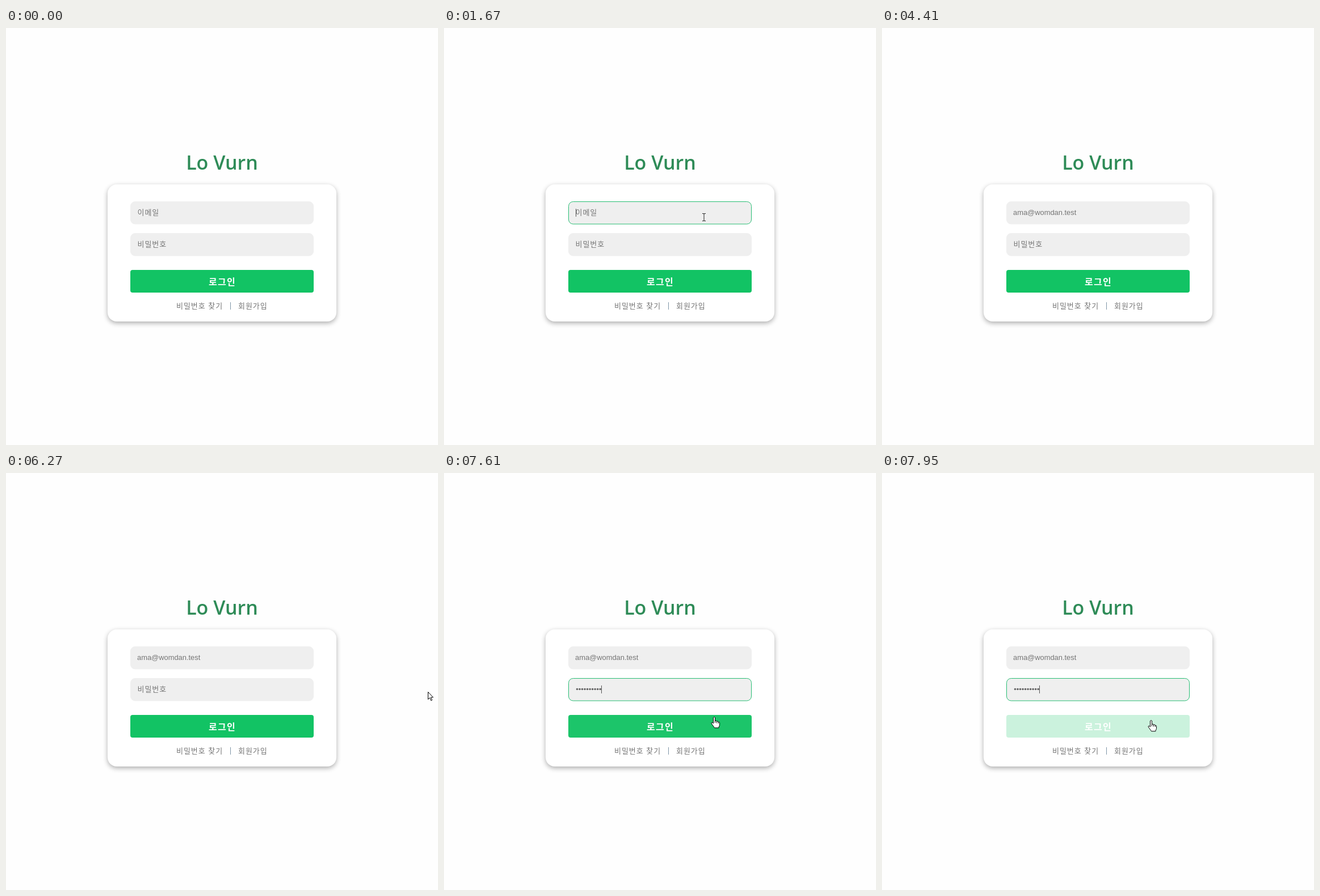
An HTML page that plays this animation: 761 px wide and 736 px high, repeating every 8 s.

```html
<!DOCTYPE html>
<html lang="ko">
<head>
<meta charset="utf-8">
<title>Login</title>
<style>
  html, body { margin: 0; width: 100%; height: 100%; overflow: hidden; background: #fefefe; }
  svg { display: block; position: absolute; left: 0; top: 0; }
  .card { position: absolute; left: 179px; top: 276px; width: 403px; height: 241.5px; border-radius: 16px; background: #fff; box-shadow: 0 3px 9px rgba(0, 0, 0, .32); }
  text { font: 13px "Noto Sans CJK KR", "Noto Sans CJK", sans-serif; fill: #757575; }
  .ko { letter-spacing: .95px; }
  .title { font: 600 34px "Open Sans", "Noto Sans", sans-serif; fill: #2e8b57; }
  .mail { font: 12.9px "Liberation Sans", Arial, sans-serif; }
  .label { font-size: 16px; font-weight: 700; letter-spacing: 1.2px; fill: #fff; }
  .field { fill: #efefef; stroke-width: 1; }
  .caret { fill: #555; }
  .pointer { fill: #fff; stroke: #000; stroke-width: 1; stroke-linejoin: round; }
</style>
</head>
<body>
<div class="card"></div>
<svg width="761" height="736" viewBox="0 0 761 736">
  <text class="title" x="380.5" y="250" text-anchor="middle">Lo Vurn</text>

  <rect id="field1" class="field" x="219.5" y="306.5" width="322" height="39.5" rx="8"/>
  <text id="hint1" class="ko" x="231.5" y="330">이메일</text>
  <text id="mail" class="mail" y="330">ama@womdan.test</text>
  <rect id="caret1" class="caret" y="319" width="1" height="14"/>

  <rect id="field2" class="field" x="219.5" y="362.5" width="322" height="39.5" rx="8"/>
  <text id="hint2" class="ko" x="231.5" y="386">비밀번호</text>
  <g id="dots" fill="#666"></g>
  <rect id="caret2" class="caret" y="375" width="1" height="14"/>

  <rect id="button" x="219" y="427" width="323" height="40" rx="4" fill="#12c364"/>
  <text class="label" x="381" y="453.5" text-anchor="middle">로그인</text>

  <text class="ko" x="300" y="494.5">비밀번호 찾기</text>
  <rect x="395" y="484" width="1" height="13" fill="#7f96a8"/>
  <text class="ko" x="409" y="494.5">회원가입</text>

  <g id="cursor">
    <path id="arrow" class="pointer" d="M.5 .5v13l3-2.8 2.2 5 2-.9-2.2-4.8h4z"/>
    <path id="beam" fill="none" stroke="#222" d="M-3-6.5h2.3q.7 0 .7.7q0-.7.7-.7h2.3M0-6v12M-3 6.5h2.3q.7 0 .7-.7q0 .7.7.7h2.3"/>
    <path id="hand" class="pointer" d="M-1.5 1.5q1.5-2 3 0v6q3-1 3 .8q2.6-.6 2.8 1q2.2 0 2.2 2v3q0 2-1.5 4v1.5h-7.5q-1-2-3.5-5l-2-3q0-2 2-1.2l1.5 1.5zM1.5 7v4M4.5 8v3.5M7.3 9.5v2.5"/>
  </g>
</svg>
<script>
const LOOP = 8000;
const $ = id => document.getElementById(id);
const show = (id, on) => $(id).setAttribute('visibility', on ? 'visible' : 'hidden');
const linear = p => p;
const easeIn = p => p * p;
const easeOut = p => 1 - (1 - p) * (1 - p);
const easeInOut = p => p * p * (3 - 2 * p);

// start, end, intervals, from, to, easing
const moves = [
  [790, 1330, 8, [750, 488], [473, 342], easeOut],
  [1330, 1590, 4, [473, 342], [469, 339], linear],
  [1670, 1670, 1, [458, 334], [458, 334], linear],
  [2060, 2130, 1, [462, 340], [465, 344], linear],
  [2790, 3000, 3, [469, 343], [730, 333], easeIn],
  [3080],
  [6270, 6870, 9, [743, 386], [498, 393], easeInOut],
  [7020, 7140, 2, [492, 393], [484, 395], linear],
  [7280, 7610, 5, [483, 396], [476, 430], easeInOut],
  [7610, 7810, 3, [476, 430], [474, 437], easeOut],
  [7950, 7950, 1, [474, 436], [474, 436], linear]
];

function stepped(t, start, end, n) {
  if (t >= end) return 1;
  return Math.max(0, Math.floor((t - start) / (end - start) * n + 1e-6) / n);
}

function cursorAt(t) {
  const move = moves.filter(m => m[0] <= t).pop();
  if (!move || move.length < 2) return null;
  const [start, end, n, from, to, ease] = move;
  const p = ease(stepped(t, start, end, n));
  return from.map((v, i) => Math.round(v + (to[i] - v) * p));
}

function cursorKind([x, y]) {
  const row = (top, bottom) => x >= 219 && x <= 542 && y >= top && y <= bottom;
  if (row(306, 346) || row(362, 402)) return 'beam';
  return row(427, 467) ? 'hand' : 'arrow';
}

const blink = (t, since) => Math.floor((t - since) / 540) % 2 === 0;

function field(n, t, focused, filled, focusTime, fillTime, endX) {
  $('field' + n).setAttribute('stroke', focused ? '#27bd73' : '#efefef');
  show('hint' + n, !filled);
  show('caret' + n, focused && blink(t, filled ? fillTime : focusTime));
  $('caret' + n).setAttribute('x', filled ? endX : 232);
}

function draw(t) {
  const mailFocus = t >= 1590 && t < 4410;
  field(1, t, mailFocus, t >= 2390, 1590, 2390, 343);
  show('mail', t >= 2390);
  $('mail').setAttribute('x', mailFocus ? 232 : 231);

  field(2, t, t >= 7080, t >= 7480, 7080, 7480, 277);
  show('dots', t >= 7480);

  const fade = t < 7600 ? 0 : Math.min(1, (t - 7600) / 200);
  $('button').setAttribute('opacity', 1 - .78 * fade);

  const pos = cursorAt(t);
  const kind = pos && cursorKind(pos);
  for (const id of ['arrow', 'beam', 'hand']) show(id, id === kind);
  if (pos) $('cursor').setAttribute('transform', `translate(${pos})`);
}

$('dots').innerHTML = Array.from({ length: 10 }, (_, i) =>
  `<circle cx="${234.5 + i * 4.52}" cy="381.5" r="1.8"/>`).join('');

const began = performance.now();
function tick() {
  draw((performance.now() - began) % LOOP);
  requestAnimationFrame(tick);
}
tick();
</script>
</body>
</html>
```
